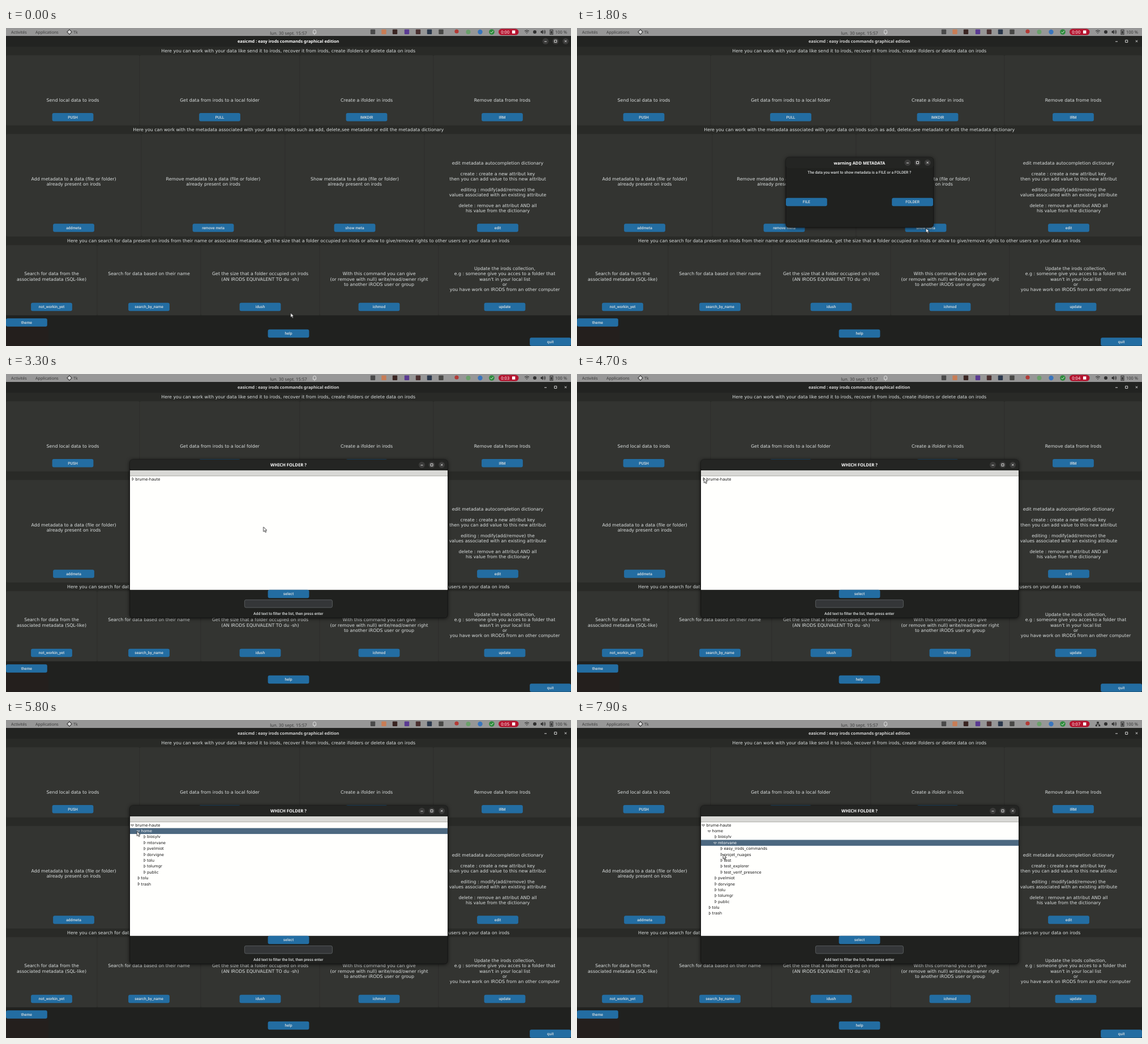
An HTML page that plays this animation: 998x561 px, repeating every 8000 ms.

```html
<!DOCTYPE html>
<html lang="en">
<head>
<meta charset="utf-8">
<title>easicmd</title>
<style>
html, body { margin: 0; width: 100%; height: 100%; overflow: hidden; background: #20211f; }
svg { display: block; }
text { fill: #dce0e0; white-space: pre; text-rendering: geometricPrecision; }
.body { font: 7.86px "DejaVu Sans", sans-serif; }
.ui { font: 500 6.78px Roboto, sans-serif; }
.title { font: bold 7.35px "Noto Sans", sans-serif; fill: #fff; }
.bar { font: 7.1px "Noto Sans", sans-serif; fill: #3a3a3a; }
.tree { font: 6.8px "DejaVu Sans", sans-serif; fill: #111; }
.sel { fill: #fff; }
.mid { text-anchor: middle; }
.line { fill: none; stroke: #eee; stroke-width: .9; }
.dark { fill: none; stroke: #2c2c2c; stroke-width: 1; }

.anim { animation: 8s step-end infinite; }
.focus { animation-name: focus; }
.dim { animation-name: dim; }
.press { animation-name: press; }
.ask { animation-name: ask; }
.pick { animation-name: pick; }
.browse { animation-name: browse; }
.rows { animation-name: rows; }
.timer { animation-name: timer; }
.wifi { animation-name: wifi; }
.wired { animation-name: wired; }
.cursor { animation-name: cursor; }

@keyframes focus { 0% { opacity: 1 } 18.75%, 100% { opacity: 0 } }
@keyframes dim { 0% { opacity: 1 } 18.75%, 100% { opacity: .8 } }
@keyframes press { 0% { opacity: 0 } 12.5% { opacity: 1 } 18.75%, 100% { opacity: 0 } }
@keyframes ask { 0% { opacity: 0 } 18.75% { opacity: 1 } 41.25%, 100% { opacity: 0 } }
@keyframes pick { 0% { opacity: 0 } 28.75% { opacity: 1 } 32.5%, 100% { opacity: 0 } }
@keyframes browse { 0% { opacity: 0 } 41.25%, 100% { opacity: 1 } }
@keyframes wifi { 0% { opacity: 1 } 92.5%, 100% { opacity: 0 } }
@keyframes wired { 0% { opacity: 0 } 92.5%, 100% { opacity: 1 } }
@keyframes rows {
  0% { transform: translateY(0) }
  62.5% { transform: translateY(-201px) }
  70% { transform: translateY(-402px) }
  92.5%, 100% { transform: translateY(-603px) }
}
@keyframes timer {
  0% { transform: translateY(0) }
  23.75% { transform: translateY(-14px) }
  41.25% { transform: translateY(-28px) }
  52.5% { transform: translateY(-42px) }
  63.75% { transform: translateY(-56px) }
  92.5%, 100% { transform: translateY(-70px) }
}
@keyframes cursor {
  0% { transform: translate(502.6px, 502.4px) }
  1.25% { transform: translate(502.6px, 502.4px); animation-timing-function: steps(9) }
  12.5% { transform: translate(616.3px, 353px) }
  23.75% { transform: translate(616.3px, 353px); animation-timing-function: steps(4) }
  28.75% { transform: translate(585px, 308px) }
  32.5% { transform: translate(582px, 320.5px); animation-timing-function: steps(3) }
  36.25% { transform: translate(581px, 322.4px) }
  41.25% { transform: translate(454.7px, 269.8px); animation-timing-function: steps(12) }
  56.25% { transform: translate(224.3px, 183.7px) }
  62.5% { transform: translate(224.3px, 183.7px); animation-timing-function: steps(5) }
  68.75% { transform: translate(231.2px, 196.2px) }
  78.75% { transform: translate(231.2px, 196.2px); animation-timing-function: steps(7) }
  87.5% { transform: translate(243px, 214px) }
  92.5%, 100% { transform: translate(258px, 236.8px) }
}
</style>
</head>
<body>
<svg width="998" height="561" viewBox="0 0 998 561"></svg>
<script>
const rect = (x, y, w, h, fill, more = '') =>
  `<rect x="${x}" y="${y}" width="${w}" height="${h}" fill="${fill}" ${more}/>`;
const dot = (x, y, r, fill) => `<circle cx="${x}" cy="${y}" r="${r}" fill="${fill}"/>`;
const path = (d, cls, more = '') => `<path d="${d}" class="${cls}" ${more}/>`;
const label = (x, y, str, cls, more = '') => `<text x="${x}" y="${y + 2.6}" class="${cls}" ${more}>${str}</text>`;
const anim = (name, inner) => `<g class="anim ${name}">${inner}</g>`;

const lines = (x, y, str) => str.split('\n')
  .map((s, i) => s && label(x, y + i * 9.36, s, 'body mid')).join('');

const button = (x, y, str, fill = '#236da2') =>
  rect(x - 36.4, y - 7.3, 72.8, 14.6, fill, 'rx="3"') + label(x, y - .2, str, 'ui mid');

const glyphs = (xs, y) => {
  const [a, b, c] = xs;
  return path(`M${a - 2} ${y + .6}h4M${b - 2} ${y - 2}h4v4h-4zM${c - 1.7} ${y - 1.7}l3.4 3.4m0 -3.4l-3.4 3.4`, 'line');
};
const discs = (xs, y) => xs.map(x => dot(x, y, 5.5, '#3b3b3a')).join('');

// Header strip, then cells given as [right edge, text y, text, button]
const section = (y, bottom, head, by, cells) => {
  let left = 0;
  const body = cells.map(([right, ty, str, name]) => {
    const x = (left + right) / 2;
    const out = rect(left, y + 15, right - left, bottom - y - 15, '#333431', 'rx="3" stroke="#2f302d" stroke-width=".7"')
      + lines(x, ty, str) + button(x, by, name);
    left = right;
    return out;
  }).join('');
  return rect(0, y, 998, bottom - y, '#292a27') + lines(498.7, y + 7.3, head) + body;
};

const topBar = () => {
  const tray = [[648, '#4a4a4a'], [667.5, '#c97d55'], [687, '#3a2522'], [708, '#5a3a92'],
    [728, '#4a3030'], [748, '#2b384c'], [768.5, '#484846']];
  const times = ['0:00', '0:01', '0:03', '0:04', '0:05', '0:07'];
  return rect(0, 0, 998, 14, '#979797')
    + label(9, 7, 'Activités', 'bar') + label(52, 7, 'Applications', 'bar')
    + rect(109, 4, 6, 6, '#ddd', 'stroke="#333" transform="rotate(45 112 7)"')
    + label(119, 7, 'Tk', 'bar')
    + label(499, 9.3, 'lun. 30 sept. 15:57', 'bar mid', 'style="font-size:7.7px"')
    + path('M542.5 9.5v-4q0 -2 2.5 -2t2.5 2v4zM544 11.3h2', 'dark', 'style="stroke:#ddd"')
    + tray.map(([x, c]) => rect(x - 4.2, 2.6, 8.4, 8.4, c, 'rx="1"')).join('')
    + dot(796, 6, 3.6, '#b33a35') + dot(816.5, 7, 4, '#6aa06a') + dot(837.5, 7, 4.2, '#3975bd')
    + dot(858, 7, 4.8, '#2e8b3d') + path('M855.5 7l2 2 3.2 -4', 'line')
    + rect(870, 1.5, 35.5, 11, '#b4122d', 'rx="5.5"') + rect(894, 4.3, 5.4, 5.4, '#fff')
    + `<svg x="872" y="0" width="20" height="14">` + anim('timer', times.map((s, i) =>
        label(9.7, 7.2 + i * 14, s, 'bar mid', 'style="font-size:7.6px;fill:#fff"')).join('')) + '</svg>'
    + anim('wifi', path('M916 5.3q4 -3 8 0M917.5 7.3q2.5 -2 5 0M919.3 9.3h1.4', 'dark'))
    + anim('wired', rect(918.3, 3, 3.4, 3, '#2c2c2c') + rect(915.8, 8.5, 3, 2.6, '#2c2c2c')
        + rect(921.2, 8.5, 3, 2.6, '#2c2c2c') + path('M920 6v1.3M917.3 8.5v-1.2h5.4v1.2', 'dark'))
    + dot(934, 7, 3, '#303030')
    + path('M944.5 5.5h1.5l2.5 -2.3v7.6l-2.5 -2.3h-1.5z', '', 'fill="#2c2c2c"')
    + path('M950 4.8q1.6 2.2 0 4.4M951.5 3.5q2.6 3.5 0 7', 'dark')
    + rect(961, 3.3, 5, 8, 'none', 'stroke="#2c2c2c"') + rect(962.3, 5.2, 2.4, 4.8, '#2c2c2c')
    + label(970, 7, '100 %', 'bar', 'style="font-size:7.5px"');
};

const mainWindow = () => {
  const xs = [953, 970.7, 988.5];
  return rect(0, 14, 998, 19, '#222321')
    + anim('dim', label(498.7, 23.6, 'easicmd : easy irods commands graphical edition', 'title mid'))
    + anim('focus', discs(xs, 23.3)) + glyphs(xs, 23.3)
    + section(33, 172, 'Here you can work with your data like send it to irods, recover it from irods, create ifolders or delete data on irods', 157.2, [
      [236, 127, 'Send local data to irods', 'PUSH'],
      [519, 127, 'Get data from irods to a local folder', 'PULL'],
      [755, 127, 'Create a ifolder in irods', 'IMKDIR'],
      [998, 127, 'Remove data frome Irods', 'IRM']])
    + section(172, 368, 'Here you can work with the metadata associated with your data on irods such as add, delete,see metadate or edit the metadata dictionary', 352.5, [
      [239, 266.5, 'Add metadata to a data (file or folder)\nalready present on irods', 'addmeta'],
      [493, 266.5, 'Remove metadata to a data (file or folder)\nalready present on irods', 'remove meta'],
      [739, 266.5, 'Show metadata to a data (file or folder)\nalready present on irods', 'show meta'],
      [998, 238.4, 'edit metadata autocompletion dictionary\n\ncreate : create a new attribut key\nthen you can add value to this new attribut\n\nediting : modify(add/remove) the\nvalues associated with an existing attribute\n\ndelete : remove an attribut AND all\nhis value from the dictionary', 'edit']])
    + section(368, 507, 'Here you can search for data present on irods from their name or associated metadata, get the size that a folder occupied on irods or allow to give/remove rights to other users on your data on irods', 492, [
      [161, 433.6, 'Search for data from the\nassociated metadata (SQL-like)', 'not_workin_yet'],
      [344, 433.6, 'Search for data based on their name', 'search_by_name'],
      [554, 433.6, 'Get the size that a folder occupied on irods\n(AN IRODS EQUIVALENT TO du -sh)', 'idush'],
      [764, 433.6, 'With this command you can give\n(or remove with null) write/read/owner right\nto another iRODS user or group', 'ichmod'],
      [998, 424.3, "Update the irods collection,\ne.g : someone give you acces to a folder that\nwasn't in your local list\nor\nyou have work on IRODS from an other computer", 'update']])
    + rect(0, 507, 998, 54, '#20211f') + rect(0, 527, 75, 34, '#241f1d')
    + button(36.4, 519.5, 'theme') + button(499, 539, 'help') + button(961.6, 553.5, 'quit')
    + anim('press', button(616, 352.5, 'show meta', '#17486d'));
};

const frame = (x, y, w, h, title, size) => {
  const r = x + w, xs = [r - 45.5, r - 28, r - 10.3];
  return rect(x, y, w, h, '#20211f', 'rx="5" stroke="#131312" stroke-width=".8" style="filter:drop-shadow(0 1px 3px #000a)"')
    + rect(x, y, w, 19, '#242523', 'rx="5"')
    + label(x + w / 2 - .4, y + 9.7, title, 'title mid', `style="font-size:${size}px"`)
    + discs(xs, y + 9.3) + glyphs(xs, y + 9.3);
};

const dialog = () => anim('ask', frame(369, 228.2, 260.5, 123.6, 'warning ADD METADATA', 7.5)
  + label(498.8, 254.8, 'The data you want to show metadata is a FILE or a FOLDER ?', 'ui mid')
  + button(405.4, 307, 'FILE') + button(592.6, 307, 'FOLDER')
  + anim('pick', button(592.6, 307, 'FOLDER', '#17486d')));

// A row is [depth, name, open]
const tree = (rows, selected, top) => rows.map(([depth, name, open], i) => {
  const y = top + 4.9 + i * 10.39, x = depth * 10.4, on = i === selected;
  const mark = open ? `M${x + 1.6} ${y - .4}h5l-2.5 2.9z` : `M${x + 4} ${y - 2.4}v5l2.9 -2.5z`;
  return (on ? rect(0, y - 4.9, 561, 10.39, '#4c6880') : '')
    + path(mark, '', `fill="none" stroke="${on ? '#eee' : '#222'}" stroke-width=".7"`)
    + label(x + 9.2, y - .2, name, on ? 'tree sel' : 'tree');
}).join('');

const browser = () => {
  const root = 'brume-haute';
  const users = ['biosylv', 'mtorvane', 'pvelmiot', 'dorvigne', 'tolu', 'tolumgr', 'public'].map(n => [2, n]);
  const files = ['easy_irods_commands', 'projet_nuages', 'test', 'test_explorer', 'test_verif_presence'].map(n => [3, n]);
  const tail = [[1, 'tolu'], [1, 'trash']];
  const open = [[0, root, true], [1, 'home', true]];
  const states = [
    [[[0, root]], -1],
    [[[0, root, true], [1, 'home'], ...tail], 0],
    [[...open, ...users, ...tail], 1],
    [[...open, users[0], [...users[1], true], ...files, ...users.slice(2), ...tail], 3]
  ];
  return anim('browse', frame(218.7, 151, 561.3, 279, 'WHICH FOLDER ?', 7.6)
    + rect(219, 170, 561, 10.5, '#d9d9d6') + rect(219, 179.6, 561, .8, '#85857f')
    + rect(219, 180.2, 561, 200.6, '#fffffd')
    + `<svg x="219" y="180" width="561" height="201">`
    + anim('rows', states.map(([rows, sel], i) => tree(rows, sel, i * 201 + .3)).join('')) + '</svg>'
    + button(499, 388, 'select')
    + rect(421.4, 398.4, 155, 13.6, '#343638', 'rx="2.5" stroke="#5d6163" stroke-width=".9"')
    + label(498.7, 421.9, 'Add text to filter the list, then press enter', 'ui mid'));
};

const cursor = () => anim('cursor', path('M0 0V8.3L2 6.5 3.4 9.6 4.9 8.9 3.5 5.9H6z', '',
  'fill="#fff" stroke="#111" stroke-width=".8" stroke-linejoin="round"'));

document.querySelector('svg').innerHTML = topBar() + mainWindow() + dialog() + browser() + cursor();
</script>
</body>
</html>
```
